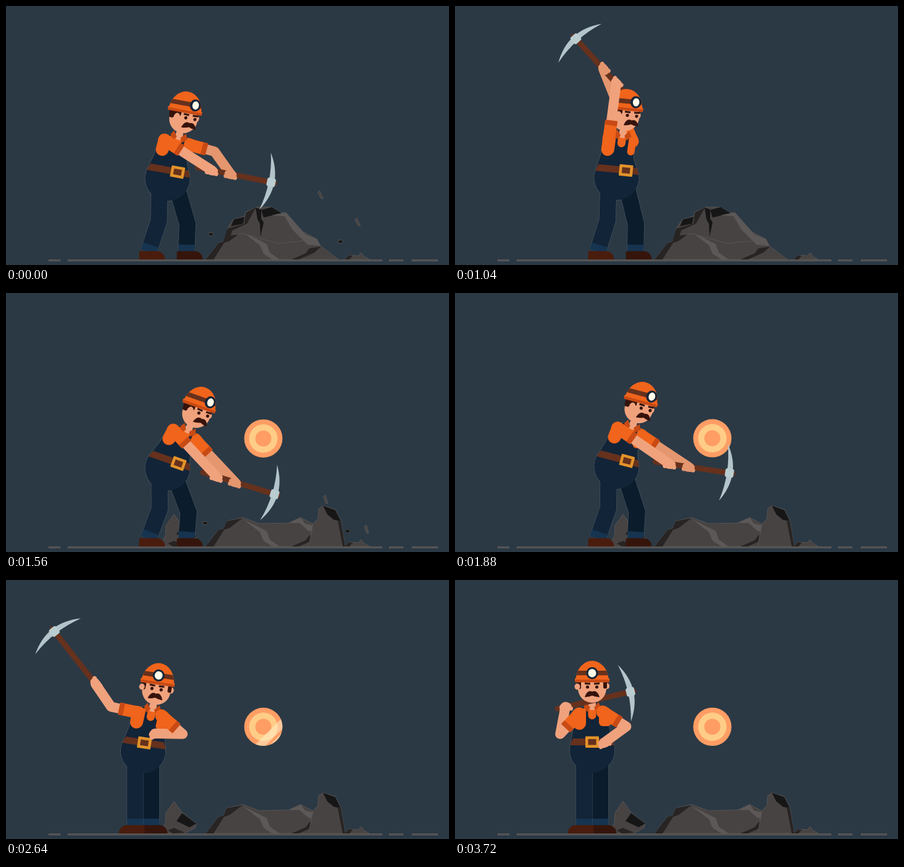
Animation of 717x420 px, one loop 3760 ms. Source, as an HTML page with a canvas:

```html
<!DOCTYPE html>
<html lang="en">
<head>
<meta charset="utf-8">
<title>Miner</title>
<style>
html, body { margin: 0; width: 717px; height: 420px; overflow: hidden; background: #2b3945; }
canvas { display: block; }
</style>
</head>
<body>
<canvas id="stage" width="717" height="420"></canvas>
<script>
const ctx = document.getElementById('stage').getContext('2d');
const LOOP = 3760, BREAK = 1120, BONE = 45, SLEEVE = 30;
const C = {
  bg: '#2b3945', navy: '#122438', shade: '#0b1c2c', cuff: '#163450',
  orange: '#f0641b', rust: '#c84a14', brown: '#66311d', hair: '#35130b',
  skin: '#f0a27d', farSkin: '#e4966e', boot: '#4a1c0d', farBoot: '#35150b',
  rock: '#474342', light: '#5c5857', dark: '#272423', black: '#171616',
  halo: 'rgba(205,205,195,.24)'
};

const mix = (a, b, u) => a + (b - a) * u;
const lerp = (p, q, u) => [mix(p[0], q[0], u), mix(p[1], q[1], u)];
const add = (p, q) => [p[0] + q[0], p[1] + q[1]];
const dist = (p, q) => Math.hypot(q[0] - p[0], q[1] - p[1]);
const turned = ([x, y], deg) => {
  const a = deg * Math.PI / 180, c = Math.cos(a), s = Math.sin(a);
  return [x * c - y * s, x * s + y * c];
};
const smooth = u => u * u * (3 - 2 * u);
const rush = u => u ** 3;
const settle = u => 1 - (1 - u) ** 3;
const overshoot = u => 1 + 2.7 * (u - 1) ** 3 + 1.7 * (u - 1) ** 2;
const span = (t, from, to) => Math.max(0, Math.min(1, (t - from) / (to - from)));

// Angles in degrees; reach is the distance from the near shoulder to its hand.
const poses = {
  strike: { tilt: 15, arm: 32.6, reach: 91, pick: 11.5 },
  raise: { tilt: -5, arm: -81.5, reach: 94, pick: -138 },
  poised: { tilt: 8, arm: -82.5, reach: 92, pick: -132 },
  dig: { tilt: 28, arm: 47, reach: 103, pick: 17 },
  lift: { tilt: 2, arm: 0, reach: 100, pick: -15 },
  swing: { tilt: 12.5, arm: -146, reach: 84, pick: -129 },
  rest: { tilt: 0, arm: -153, reach: 25, pick: -13 }
};
const script = [
  [0, 'strike'], [120, 'strike'], [640, 'raise', rush], [1040, 'poised'], [BREAK, 'dig'], [1720, 'dig'],
  [2200, 'lift'], [2560, 'swing', overshoot], [2640, 'swing'], [3040, 'rest', settle], [LOOP, 'rest']
];

function poseAt(t) {
  const i = script.findIndex(key => t < key[0]);
  const [from, a] = script[i - 1], [to, b, ease = smooth] = script[i];
  const u = ease(span(t, from, to)), pose = {};
  for (const part in poses[a]) pose[part] = mix(poses[a][part], poses[b][part], u);
  return pose;
}

function local([x, y], deg, draw) {
  ctx.save();
  ctx.translate(x, y);
  ctx.rotate(deg * Math.PI / 180);
  draw();
  ctx.restore();
}
function poly(fill, points, edge) {
  ctx.beginPath();
  points.split(' ').forEach(p => ctx.lineTo(...p.split(',')));
  ctx.closePath();
  ctx.fillStyle = fill;
  ctx.fill();
  if (edge) { ctx.strokeStyle = edge; ctx.lineWidth = .8; ctx.stroke(); }
}
function oval(fill, x, y, rx, ry = rx) {
  ctx.fillStyle = fill;
  ctx.beginPath();
  ctx.ellipse(x, y, rx, ry, 0, 0, 7);
  ctx.fill();
}
function box(fill, x, y, w, h, r = 0) {
  ctx.fillStyle = fill;
  ctx.beginPath();
  ctx.roundRect(x, y, w, h, r);
  ctx.fill();
}
function line(color, width, points, cap = 'butt') {
  ctx.strokeStyle = color;
  ctx.lineWidth = width;
  ctx.lineCap = cap;
  ctx.lineJoin = cap === 'round' ? 'round' : 'miter';
  ctx.beginPath();
  points.forEach(p => ctx.lineTo(...p));
  ctx.stroke();
}

function ground() {
  for (const [x, end] of [[69, 88], [100, 609], [620, 643], [657, 699]]) {
    box('#625e5c', x, 411, end - x, 3);
    box('#47474a', x + 1, 412, end - x - 2, 1);
  }
  poly(C.rock, '548,411 555,404 570,405 575,400 578,405 588,411', C.light);
  poly(C.dark, '548,411 555,404 561,405 556,411');
}

function rockBase() {
  poly(C.rock, '323,411 344,384 352,382 357,370 383,364 410,374 457,373 477,364 503,378 509,389 538,411', C.light);
  poly(C.dark, '323,411 344,384 352,382 357,370 383,365 362,381 353,384 336,411');
  poly(C.light, '384,367 404,377 422,386 427,400 443,411 431,411 417,402 411,388');
  poly(C.light, '458,373 477,364 484,374 503,378 509,389 490,386 475,373');
  poly(C.dark, '462,411 485,401 491,393 510,390 499,400 474,411');
}
function rockCap() {
  poly(C.rock, '357,372 358,361 368,346 386,341 388,334 405,326 430,326 444,335 453,335 484,370 490,380 440,385 383,369', C.light);
  poly(C.dark, '352,382 358,361 386,353 388,335 405,326 390,353 366,364 361,381');
  poly(C.black, '364,357 369,346 386,342 384,353');
  poly(C.black, '413,331 430,326 446,336 417,343');
  poly(C.black, '404,327 413,330 413,345 417,351 412,374 411,353 407,346');
  poly(C.light, '430,339 453,335 484,370 503,378 509,389 488,387 463,362 451,341');
}
function rockPieces(t) {
  const u = span(t, BREAK, BREAK + 300), left = 1 - u, hop = u * left;
  local([278 + 95 * left, 388 - 40 * left - 190 * hop], 140 * left, () => {
    poly(C.rock, '-28,20 -20,6 -19,-11 -6,-29 7,-11 30,7 28,14 11,23 -24,23', C.light);
    poly(C.black, '7,-10 30,7 19,13 -2,3');
    poly(C.dark, '-16,18 -6,14 12,22 -8,23');
  });
  local([-85 * left, -22 * left - 130 * hop], 0, () => {
    poly(C.rock, '490,411 497,374 505,366 506,350 513,345 533,351 542,369 549,411', C.light);
    poly(C.black, '513,345 533,352 542,370 531,368 520,359');
    poly(C.dark, '537,370 542,370 549,411 545,411');
  });
}

// Chips leave the rock top; slivers fly in an arc, pebbles skid low.
function chips(age) {
  const u = age / 400, fall = 290 * u * (u - 1);
  for (const [dx, dy] of [[84, -34], [144, 10]]) {
    const y = 340 + dy * u + fall;
    if (y < 402) local([425 + dx * u, y], 62 + 90 * (u - 1), () => poly(C.rock, '-7,-2 7,-1 5,2 -6,2', C.light));
  }
  for (const dx of [116, -93]) {
    if (u > 1.4) continue;
    const x = 425 + dx * u, y = 340 + (dx > 0 ? 42 : 30) * u;
    oval(C.light, x, y, 4.3, 2.8);
    oval(C.black, x, y, 3.6, 2.2);
  }
}

function coin(t) {
  const s = t - BREAK;
  local([416.5, 238 + 110 * Math.exp(-s / 200) * Math.cos(s * .00395)], 0, () => {
    oval('#ff9d64', 0, 0, 31);
    oval('#ffcd87', 0, 0, 23);
    oval('#ff9d64', 0, 0, 13);
    ctx.beginPath();
    ctx.arc(0, 0, 31, 0, 7);
    ctx.clip();
    ctx.rotate(Math.PI / 4);
    ctx.globalAlpha = .5;
    const shine = mix(-50, 60, (t - 2360) / 440);
    box('#fff3d0', shine - 9, -40, 13, 80);
    box('#fff3d0', shine + 8, -40, 4, 80);
  });
}

function leg(hip, foot, bend, color, bootColor, facing) {
  const ankle = foot.at, knee = add(lerp(hip, ankle, .55), [bend, 0]);
  line(C.halo, 27.6, [hip, knee, ankle]);
  line(color, 26.5, [hip, knee, ankle]);
  line(C.cuff, 26.5, [lerp(ankle, knee, 11 / dist(ankle, knee)), ankle]);
  local(ankle, foot.deg, () => {
    ctx.scale(facing, 1);
    box(bootColor, -15.5, -.5, 42, 13.5, [3, 14, 0, 0]);
  });
}

function torso(belly, tilt, turn) {
  const side = 13 + 8 * (1 - turn), bib = 23 + 5 * (1 - turn);
  local(belly, tilt, () => {
    poly(C.navy, `-15,-71 13,-71 ${bib - 2},-62 ${bib},-35 36,-6 -36,-6 -31,-33 -30,-60`, C.halo);
    box(C.orange, -31, -68, 21, 35, [12, 0, 11, 10]);
    box(C.orange, 11, -69, side - 1, 30, [0, 8, 6, 6]);
    box(C.orange, -6.5, -71, 13, 21, 6.5);
    box(C.skin, -6, -80, 12, 15, 5);
    for (const s of [-1, 1]) poly(C.rust, `${s * 10},-78 ${s * 3},-69 ${s * 8},-62 ${s * 14},-70`);
  });
  local(belly, tilt * .7, () => {
    oval(C.navy, 0, 0, 36.3);
    ctx.save();
    ctx.clip();
    box(C.brown, -40, -19, 80, 11);
    ctx.restore();
    box('#e2932a', 14 * turn - 11, -22.5, 22, 18.5, 1);
    box(C.brown, 14 * turn - 6.5, -18, 13, 9.5);
  });
}

// Two equal bones; the elbow falls on the given side of the shoulder-hand line.
function arm(shoulder, hand, side, skin) {
  const d = dist(shoulder, hand), bulge = Math.sqrt(Math.max(0, BONE ** 2 - d * d / 4)) * side / d;
  const elbow = add(lerp(shoulder, hand, .5), [(hand[1] - shoulder[1]) * bulge, (shoulder[0] - hand[0]) * bulge]);
  const along = px => lerp(shoulder, elbow, px / dist(shoulder, elbow));
  line(skin, 16, [along(SLEEVE), elbow, hand], 'round');
  line(C.orange, 21, [shoulder, along(4)], 'round');
  line(C.orange, 20, [shoulder, along(SLEEVE)]);
  line(C.rust, 20, [along(SLEEVE - 6), along(SLEEVE + 2)]);
}

function fist(at, deg, skin) {
  local(at, deg, () => {
    oval(skin, 0, 0, 10, 7);
    for (let x = -7; x < 9; x += 5) oval(skin, x, 4.5, 3.5);
  });
}

function pickaxe(head, deg) {
  local(head, deg, () => {
    line(C.brown, 9, [[-121, 0], [5, 0]], 'round');
    ctx.fillStyle = '#b3c5ca';
    ctx.beginPath();
    ctx.moveTo(-10, -47);
    ctx.quadraticCurveTo(20, 0, -10, 47);
    ctx.quadraticCurveTo(2, 0, -10, -47);
    ctx.fill();
    box('#b9cdd1', -7, -7, 14, 14, 3);
  });
}

function head(at, deg, turn) {
  local(at, deg, () => {
    const face = 11 * turn, lamp = 15 * turn;
    oval(C.skin, 24 - 3 * turn, -7, 4, 5);
    oval(C.skin, 0, -3, 23, 23);
    box(C.hair, 18, -16, 6 * (1 - turn), 13, 2);
    box(C.hair, -24, -16, 6 + 13 * turn, 9, 2);
    box(C.hair, -24, -16, 6 + 2 * turn, 14, 3);
    oval(C.skin, -24 + 13 * turn, -6, 4.5, 5);
    for (const s of [-1, 1]) {
      oval(C.hair, 7.5 * s + face, -5.5, 2.6);
      local([7.5 * s + face, -11], -3 * s, () => box(C.hair, -4.5, -1.5, 9, 3));
    }
    ctx.fillStyle = C.hair;
    for (const s of [-1, 1]) {
      ctx.beginPath();
      ctx.moveTo(face, 2);
      ctx.bezierCurveTo(face + 4 * s, 0, face + 9 * s, 1, face + 12 * s, 11);
      ctx.quadraticCurveTo(face + 5 * s, 11, face - s, 8);
      ctx.fill();
    }
    ctx.save();
    ctx.beginPath();
    ctx.ellipse(0, -16, 26.5, 32, 0, Math.PI, 0);
    ctx.clip();
    box(C.orange, -30, -50, 60, 36);
    box(C.brown, -30, -32, 60, 7.5);
    ctx.restore();
    box(C.orange, -28, -20, 56, 5, 2);
    box(C.rust, -28, -17.5, 56, 4.5, 2);
    oval(C.navy, lamp, -28, 9.5 - .7 * turn, 9.8);
    oval('#fffbe8', lamp + .5 * turn, -28, 6.5 - 1.2 * turn, 6.7);
  });
}

function step(t, from, to, x, endX) {
  const u = smooth(span(t, from, to)), lift = Math.sin(Math.PI * u);
  return { at: [mix(x, endX, u), 398 - 8 * lift], deg: 20 * lift };
}

function miner(t) {
  const { tilt, arm: armAngle, reach, pick } = poseAt(t);
  const turn = 1 - smooth(span(t, 2220, 2520)), side = turn > .5;
  const near = step(t, 2060, 2440, 231, 209), far = step(t, 2260, 2560, 292, 235);
  const belly = [(near.at[0] + far.at[0]) / 2, 276 + 2 * turn + .008 * tilt * tilt];
  const joint = (x, y) => add(belly, turned([x, y], tilt));

  const shoulder = joint(-21, -59), farShoulder = joint(17, -62);
  const nearHand = add(shoulder, turned([reach, 0], armAngle));
  const onHandle = px => add(nearHand, turned([px - mix(17, 27, turn), 0], pick));
  const farHand = lerp(add(belly, [19, -12 - 1.3 * tilt]), onHandle(58), turn);
  const farArm = () => arm(farShoulder, farHand, 1, side ? C.farSkin : C.skin);

  oval(C.halo, ...belly, 36.9);
  leg(add(belly, [13 + 6 * turn - .15 * tilt * turn, 20]), far, (5 + .2 * tilt) * turn, C.shade, C.farBoot, 1);
  leg(add(belly, [-13, 8]), near, (7 + .1 * tilt) * turn, C.navy, C.boot, 2 * turn - 1);
  if (side) farArm();
  torso(belly, tilt, turn);
  if (!side) { farArm(); fist(farHand, -20, C.skin); }
  pickaxe(onHandle(125), pick);
  if (side) fist(farHand, pick, C.farSkin);
  head(joint(0, -97), tilt * .7, turn);
  arm(shoulder, nearHand, 1, C.skin);
  fist(nearHand, pick, C.skin);
}

function frame(t) {
  const broken = t >= BREAK;
  box(C.bg, 0, 0, 717, 420);
  ground();
  if (broken) coin(t);
  rockBase();
  if (broken) rockPieces(t);
  else rockCap();
  miner(t);
  chips(broken ? t - BREAK : t + 400);
}

const start = performance.now();
(function tick() {
  frame((performance.now() - start) % LOOP);
  requestAnimationFrame(tick);
})();
</script>
</body>
</html>
```
